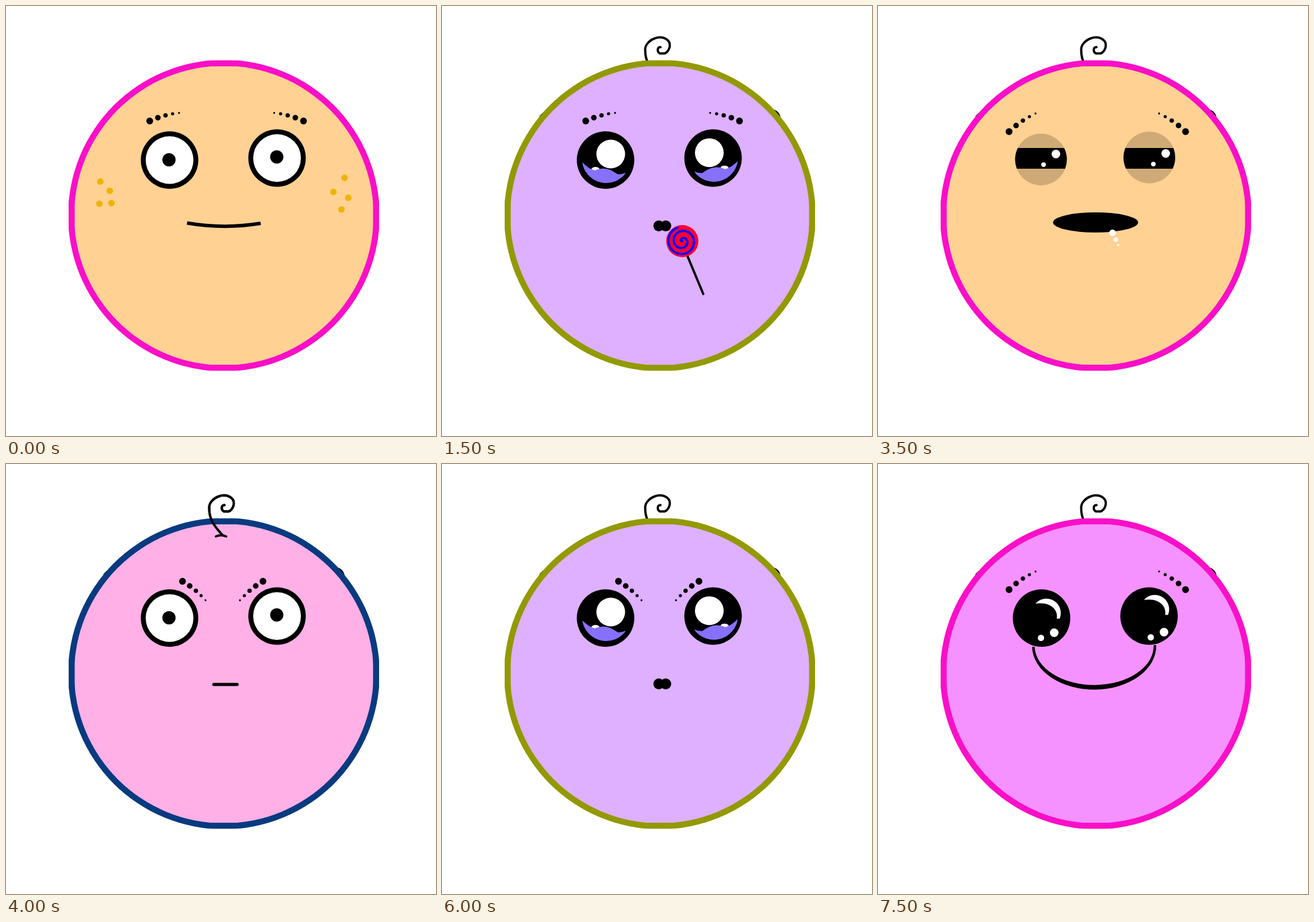
Write an HTML page with a canvas that moves like this. It is 748 px wide and 748 px high and loops after 8 s.

```html
<!DOCTYPE html>
<html lang="en">
<head>
<meta charset="utf-8">
<title>Changing faces</title>
<style>
  html, body { margin: 0; width: 100%; height: 100%; overflow: hidden; background: #fff; }
  canvas { display: block; }
</style>
</head>
<body>
<canvas id="stage" width="748" height="748"></canvas>
<script>
const ctx = document.getElementById('stage').getContext('2d');
const STEP = 500;

const skins = { peach: '#ffd193', cyan: '#31eef0', pink: '#ffb0e6', lavender: '#deb0ff', violet: '#f592ff' };
const rims = { magenta: '#fa0fc8', navy: '#083a80', olive: '#939900' };

// skin, rim, eyes, brows, mouth, extras
const faces = [
  'peach magenta ring flat smile freckles',
  'pink olive big arched oval',
  'cyan navy sleepy none line glasses bubbles curl',
  'lavender olive teary flat kiss lolly',
  'cyan olive big flat oval lolly',
  'cyan olive sleepy arched kiss lolly glasses',
  'violet magenta teary raised smile',
  'peach magenta sleepy arched oval drool',
  'pink navy ring angry line curl',
  'pink navy ring angry smile freckles',
  'pink magenta ring raised kiss',
  'cyan magenta big angry line',
  'lavender olive teary angry kiss',
  'violet navy ring flat smile',
  'peach olive sleepy raised line',
  'violet magenta big arched grin'
].map(s => s.split(' '));

function dot(x, y, r, color = '#000', ry = r) {
  ctx.fillStyle = color;
  ctx.beginPath();
  ctx.ellipse(x, y, r, ry, 0, 0, Math.PI * 2);
  ctx.fill();
}
function line(d, width, color = '#000', cap = 'round') {
  ctx.strokeStyle = color;
  ctx.lineWidth = width;
  ctx.lineCap = cap;
  ctx.stroke(new Path2D(d));
}
function shape(d, color = '#000') {
  ctx.fillStyle = color;
  ctx.fill(new Path2D(d), 'evenodd');
}
function clipped(x, y, w, h, paint) {
  ctx.save();
  ctx.beginPath();
  ctx.rect(x, y, w, h);
  ctx.clip();
  paint();
  ctx.restore();
}

// Paint once on the left, then again moved or mirrored to the right
function pair(dx, dy, paint, flip = 1) {
  paint();
  ctx.save();
  ctx.translate(dx, dy);
  ctx.scale(flip, 1);
  paint();
  ctx.restore();
}
const mirror = (sum, dy, paint) => pair(sum, dy, paint, -1);

// A disc slightly cut off by its square box
function disc(r, color) {
  clipped(379 - r, 364.5 - r, 2 * r, 2 * r, () => dot(379, 364.5, r + 1, color));
}

function hair() {
  line('M380 71.5C374 71 374 80 379 82.5H387.5C395 79 399 68 394 61C388 54 378 53 371 56C362 59 353 67 353.5 76C353 96 362 108 377 124', 4);
  line('M365 126Q374 122 383 126', 4);
}

// Five shrinking dots along a slightly bent line
function brow(x, y, dx, dy, sum) {
  mirror(sum, 0, () => {
    for (let i = 0; i < 5; i++) {
      const u = i * (0.3 - 0.0125 * i), bend = 0.16 * u * (1 - u);
      dot(x + dx * u + dy * bend, y + dy * u - dx * bend, 5.9 - 1.05 * i);
    }
  });
}
const brows = {
  none() {},
  flat: () => brow(250, 200, 51, -14, 767.5),
  raised: () => brow(247.7, 172, 51, -14, 763),
  arched: () => brow(228, 218.5, 46, -31.5, 763),
  angry: () => brow(307, 204, 40, 33, 754)
};

function eyeballs(r, color) {
  pair(187, -3.5, () => dot(284.5, 268, r, color));
}
function shine(x1, y1, r1, x2, y2, r2) {
  pair(191, -1, () => {
    dot(x1, y1, r1, '#fff');
    dot(x2, y2, r2, '#fff');
  });
}

const eyes = {
  ring() {
    eyeballs(50);
    eyeballs(41.5, '#fff');
    pair(187.5, -5, () => dot(283.5, 267.5, 11.5));
  },
  sleepy() {
    const irises = color => pair(188.5, -3.5, () => dot(283.5, 267, 45, color));
    irises('rgba(0,0,0,.19)');
    clipped(230, 247, 300, 36, irises);
    shine(309.5, 257.5, 7.5, 288, 276, 4);
  },
  teary() {
    eyeballs(50);
    mirror(758.5, -2.3, () => {
      dot(293.5, 257.5, 25, '#fff');
      dot(267, 284, 7, '#fff', 4);
      shape('M244 272Q256 284 266 286C279 281 289 281 306 293Q313 293 320 290A42 42 0 0 1 244 272', '#8870ff');
    });
  },
  big() {
    eyeballs(50);
    pair(188.5, -6.5, () => shape('M274 243A25 25 0 0 1 316 269H311C314 254 300 239 274 243', '#fff'));
    shine(306.5, 293.5, 7.5, 283.5, 302.5, 5.5);
  }
};

const mouths = {
  smile: () => line('M315 377.5Q379 388.5 443 378', 6, '#000', 'butt'),
  line: () => line('M361.5 383.5H402', 5.5),
  kiss: () => pair(12, 0, () => dot(377.2, 382.5, 9.5)),
  oval: () => dot(378.5, 376.5, 74, '#000', 17.5),
  grin: () => shape('M268 318A108 76 0 0 0 484 315H479.5A103.5 68 0 0 1 272.5 318Z')
};

// Three white drops that get smaller
function drops(x, y, r, dx, dy, shrink) {
  for (let i = 0; i < 3; i++) {
    const s = i * (1.1 - 0.1 * i);
    dot(x + dx * s, y + dy * s, r - shrink * i, '#fff');
  }
}

const extras = {
  freckles() {
    const spots = 'M164 305.5h0M180.5 321.5h0M162.5 344h0M183.5 343h0M589 299h0M569.5 323.5h0M595.5 333.5h0M583.5 354h0';
    line(spots, 11.4, '#f0b400');
  },
  glasses() {
    pair(186.5, 0, () => shape('M218.5 201.5H349.5V331H218.5ZM228 209V321H341V209Z'));
    line('M349 243.5H406', 15, '#000', 'butt');
    mirror(757, 0, () => line('M169 210L220 230', 7));
  },
  bubbles: () => drops(459, 333, 13, -19, 26.5, 4.7),
  drool: () => drops(408, 394.5, 5.7, 5.5, 11.9, 1.85),
  lolly() {
    line('M427 435L454.5 501', 4);
    dot(418, 409, 28, '#ff0033');
    let d = '';
    for (let u = 0; u <= 1; u += 0.0125) {
      const a = -1.9 - 14.4 * u, r = 25 * (1 - u ** 1.4);
      d += `${u ? 'L' : 'M'}${418 + r * Math.cos(a)} ${409 + r * Math.sin(a)}`;
    }
    line(d, 4, '#1000ff');
  },
  curl: hair
};

function draw(n) {
  const [skin, rim, eye, browName, mouth, ...more] = faces[n];
  ctx.fillStyle = '#fff';
  ctx.fillRect(0, 0, 748, 748);
  if (n >= 2) {
    hair();
    line('M574 181Q586 183 588 196', 3);
  }
  if (n >= 3) line('M171 192L176 187', 3);
  disc(270, rims[rim]);
  disc(259.5, skins[skin]);
  eyes[eye]();
  brows[browName]();
  mouths[mouth]();
  more.forEach(name => extras[name]());
}

const start = performance.now();
function tick() {
  const t = Math.max(0, performance.now() - start);
  draw(Math.floor(t / STEP) % faces.length);
  requestAnimationFrame(tick);
}
tick();
</script>
</body>
</html>
```
